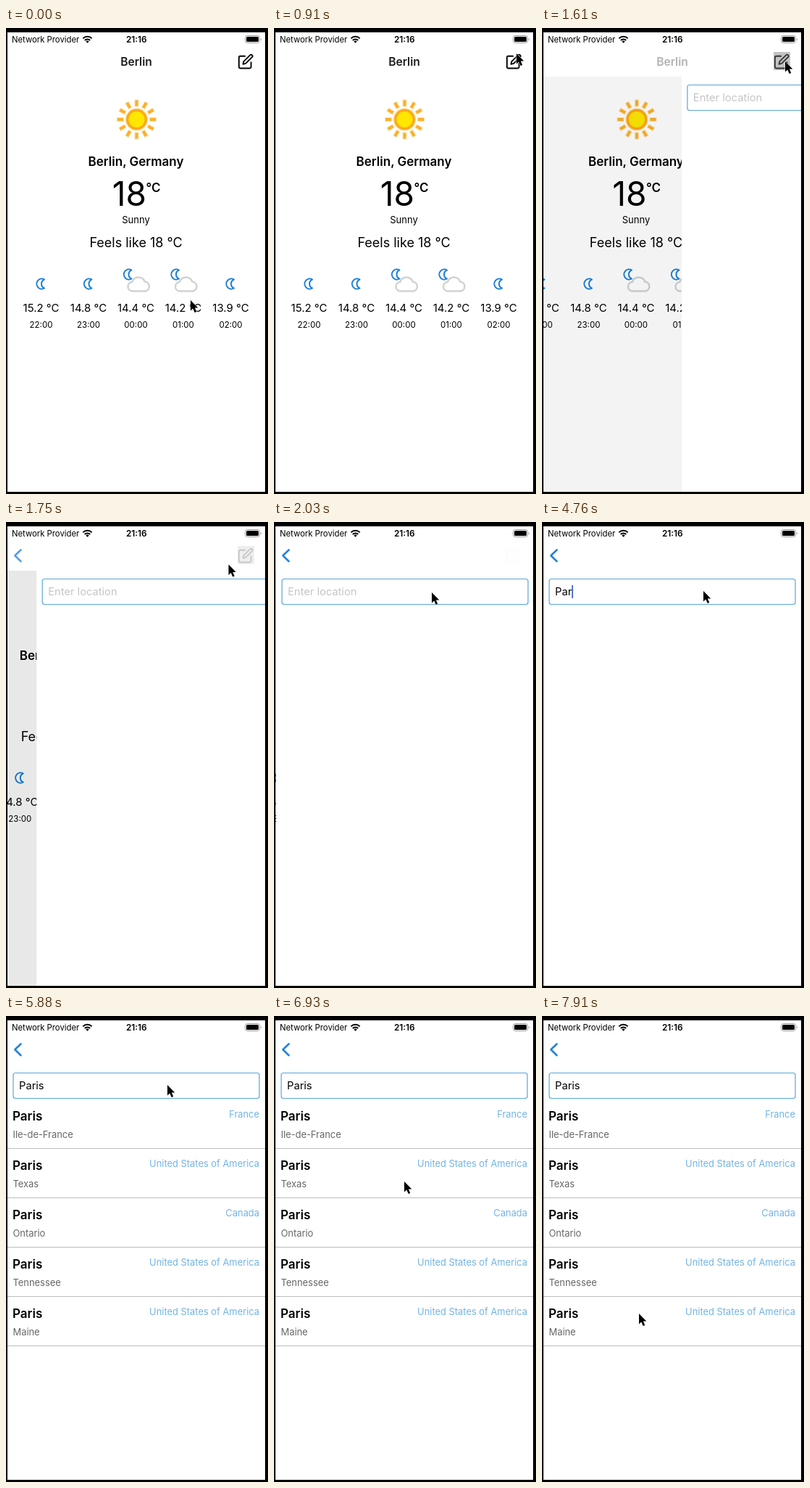
An HTML page that plays this animation: 362x642 px, repeating every 8 s.

```html
<!DOCTYPE html>
<html lang="en">
<head>
<meta charset="utf-8">
<title>Weather</title>
<style>
  html, body { margin: 0; width: 100%; height: 100%; overflow: hidden; background: #000; }
  svg { display: block; width: 100vw; height: 100vh; }
  text { font-family: Inter, Roboto, "Liberation Sans", sans-serif; }
  .mid { text-anchor: middle; }
  .end { text-anchor: end; }
  .bold { font-weight: 600; }
  .line { fill: none; stroke: #000; stroke-width: 2; stroke-linecap: round; stroke-linejoin: round; }
</style>
</head>
<body>
<svg viewBox="0 0 362 642">
  <defs>
    <clipPath id="screen"><path d="M2 6H358V639H2Z"/></clipPath>
    <path id="moon" d="M5.5-6A7 7 0 1 0 5.5 6A6.5 6.5 0 0 1 5.5-6Z" fill="#fff" stroke="#1b7fd6" stroke-width="2" stroke-linejoin="round"/>
    <path id="cloud" d="M-6.2 10.2A6.3 6.3 0 0 1-5.7-2.3A9.3 9.3 0 0 1 11.8-2.8A6.6 6.6 0 0 1 12.8 10.2Z" fill="#fff" stroke="#d2d2d2" stroke-width="2.5" stroke-linejoin="round"/>
  </defs>
  <rect width="362" height="642"/>
  <g clip-path="url(#screen)">
    <rect width="362" height="642" fill="#fff"/>

    <g id="weather">
      <g id="sun" transform="translate(180.5 126)"></g>
      <text class="mid bold" x="179.5" y="190" font-size="17">Berlin, Germany</text>
      <text class="end" x="194" y="245" font-size="46">18</text>
      <text class="bold" x="193.5" y="226" font-size="17">°C</text>
      <text class="mid" x="179.5" y="268.5" font-size="13">Sunny</text>
      <text class="mid" x="179.5" y="302" font-size="18">Feels like 18 °C</text>
      <g id="hours"></g>
    </g>
    <rect id="dim" y="67" width="362" height="575"/>

    <g id="search">
      <rect x="2" y="67" width="356" height="575" fill="#fff"/>
      <rect x="10" y="78.5" width="340" height="35" rx="3" fill="#fff" stroke="#5ba6d9" stroke-width="1.2"/>
      <text id="hint" x="18" y="101" font-size="14.7" fill="#c5c5c8">Enter location</text>
      <text id="typed" x="18" y="101" font-size="14.7"></text>
      <rect id="caret" y="87" width="1.7" height="18" fill="#3a62cc"/>
      <g id="results"></g>
    </g>

    <text id="title" class="mid bold" x="180" y="51.5" font-size="15.6" fill="#1c1c1e">Berlin</text>
    <g id="edit">
      <rect id="press" x="320" y="33" width="23" height="25" fill="#b3b3b3"/>
      <g class="line" transform="translate(320 35) scale(.93)">
        <path d="M11 4H4a2 2 0 0 0-2 2v14a2 2 0 0 0 2 2h14a2 2 0 0 0 2-2v-7"/>
        <path d="M18.5 2.5a2.1 2.1 0 0 1 3 3L12 15l-4 1 1-4z"/>
      </g>
    </g>
    <path id="back" d="M20.5 38.5L12.3 46.3L20.5 54.2" class="line" style="stroke:#2583d8;stroke-width:2.6"/>

    <text x="8" y="20" font-size="11.3">Network Provider</text>
    <g fill="none" stroke="#000" stroke-width="2">
      <path d="M106.4 14.4A8.6 8.6 0 0 1 118.6 14.4"/>
      <path d="M108.8 17A5.2 5.2 0 0 1 116.2 17"/>
    </g>
    <path d="M112.5 20.8L110.3 18.6A3 3 0 0 1 114.7 18.6Z"/>
    <text class="mid bold" x="180.3" y="20" font-size="11.8">21:16</text>
    <rect x="330.5" y="10.5" width="20" height="10" rx="3" fill="none" stroke="#999"/>
    <rect x="332" y="12" width="17" height="7" rx="1.6"/>
    <path d="M352 14a2 2 0 0 1 0 3.4Z" fill="#999"/>
  </g>
  <path id="cursor" d="M0 0V14.5L3.3 11.4L5.7 17L8.2 16L5.9 10.5H10.3Z" stroke="#fff" stroke-width="1" paint-order="stroke"/>
</svg>
<script>
const LOOP = 8000, STEP = 70;
const el = id => document.getElementById(id);
const clamp = v => Math.max(0, Math.min(1, v));
const set = (id, name, value) => el(id).setAttribute(name, value);

// Each key is [time, ...values]; values between keys are linear.
function track(keys, t) {
  const i = keys.findIndex(k => k[0] > t);
  if (i === 0) return keys[0].slice(1);
  if (i < 0) return keys[keys.length - 1].slice(1);
  const a = keys[i - 1], b = keys[i], f = (t - a[0]) / (b[0] - a[0]);
  return a.slice(1).map((v, j) => v + (b[j + 1] - v) * f);
}

const POINTER = [
  [70, 255, 375], [210, 226, 325], [280, 218, 290], [420, 250, 225], [560, 298, 171],
  [630, 298, 171], [910, 335, 35], [1120, 335, 35], [1400, 336, 46], [1680, 336, 46],
  [1960, 222, 96], [2030, 218, 97], [2240, 219, 97], [2310, 228, 78], [2380, 218, 97],
  [2730, 218, 97], [2800, 223, 95], [6580, 223, 95], [6930, 180, 228],
  [7420, 150, 320], [7910, 134, 410]
];
const BLINK = [
  [2240, 0], [2310, 1], [2870, 1], [3080, 0], [3220, 0], [3430, 1], [5600, 1], [5740, 0],
  [6020, 0], [6160, 1], [6580, 1], [6720, 0], [7000, 0], [7140, 1], [7420, 1], [7630, 0]
];
const KEYSTROKES = [4060, 4410, 4760, 4970, 5110];

const rays = (color, width, from, to) => Array.from({ length: 12 }, (_, i) =>
  `<path d="M0 ${-from}V${-to}" transform="rotate(${i * 30})" stroke="${color}" stroke-width="${width}"/>`).join("");
el("sun").innerHTML = rays("#fde3b0", 6, 17.5, 27.5) + rays("#fbb02d", 4, 18.5, 26.5) +
  `<circle r="15.5" fill="#fcd58c"/><circle r="14.3" fill="#fba919"/><circle r="11" fill="#ffe700"/>`;

const FORECAST = [["15.2", "22:00"], ["14.8", "23:00"], ["14.4", "00:00", 1], ["14.2", "01:00", 1], ["13.9", "02:00"]];
el("hours").innerHTML = FORECAST.map(([temp, hour, cloudy], i) => {
  const x = 48.5 + 65.5 * i;
  const icon = cloudy
    ? `<use href="#moon" x="${x - 11.5}" y="339.5"/><use href="#cloud" x="${x + 0.5}" y="352.3"/>`
    : `<use href="#moon" x="${x - 1}" y="352.5"/>`;
  return `${icon}<text class="mid" x="${x}" y="391" font-size="15">${temp} °C</text>
    <text class="mid" x="${x}" y="413" font-size="11.5">${hour}</text>`;
}).join("");

const USA = "United States of America";
const PLACES = [["Ile-de-France", "France"], ["Texas", USA], ["Ontario", "Canada"], ["Tennessee", USA], ["Maine", USA]];
el("results").innerHTML = PLACES.map(([region, country], i) =>
  `<g transform="translate(0 ${68 * i})">
    <text class="bold" x="9" y="144" font-size="17">Paris</text>
    <text x="9.5" y="168" font-size="12.9" fill="#666">${region}</text>
    <text class="end" x="350" y="140" font-size="12.9" fill="#73b4e3">${country}</text>
    <path d="M2 182.5H358" stroke="#bdbdbd"/>
  </g>`).join("");

function draw(t) {
  // Critically damped spring for the page push.
  const s = Math.max(0, t - 1509) * 0.0155;
  const p = 1 - (1 + s) * Math.exp(-s);
  set("weather", "transform", `translate(${-0.3 * 356 * p} 0)`);
  set("dim", "opacity", 0.1 * p);
  set("search", "transform", `translate(${356 * (1 - p)} 0)`);
  set("title", "opacity", clamp(1 - 1.43 * p));
  set("press", "opacity", clamp((t - 1330) / 140));
  set("edit", "opacity", 1 - p * p);
  set("back", "opacity", clamp(2 * p - 1));

  const typed = "Paris".slice(0, KEYSTROKES.filter(k => t >= k).length);
  el("typed").textContent = typed;
  set("hint", "opacity", typed ? 0 : 1);
  set("caret", "x", 18 + (typed ? el("typed").getComputedTextLength() : 1));
  set("caret", "opacity", track(BLINK, t)[0]);
  set("results", "opacity", t >= 5740 ? 1 : 0);
  set("cursor", "transform", `translate(${track(POINTER, t)})`);
}

function tick() {
  draw(Math.floor(performance.now() % LOOP / STEP) * STEP);
  requestAnimationFrame(tick);
}
tick();
</script>
</body>
</html>
```
